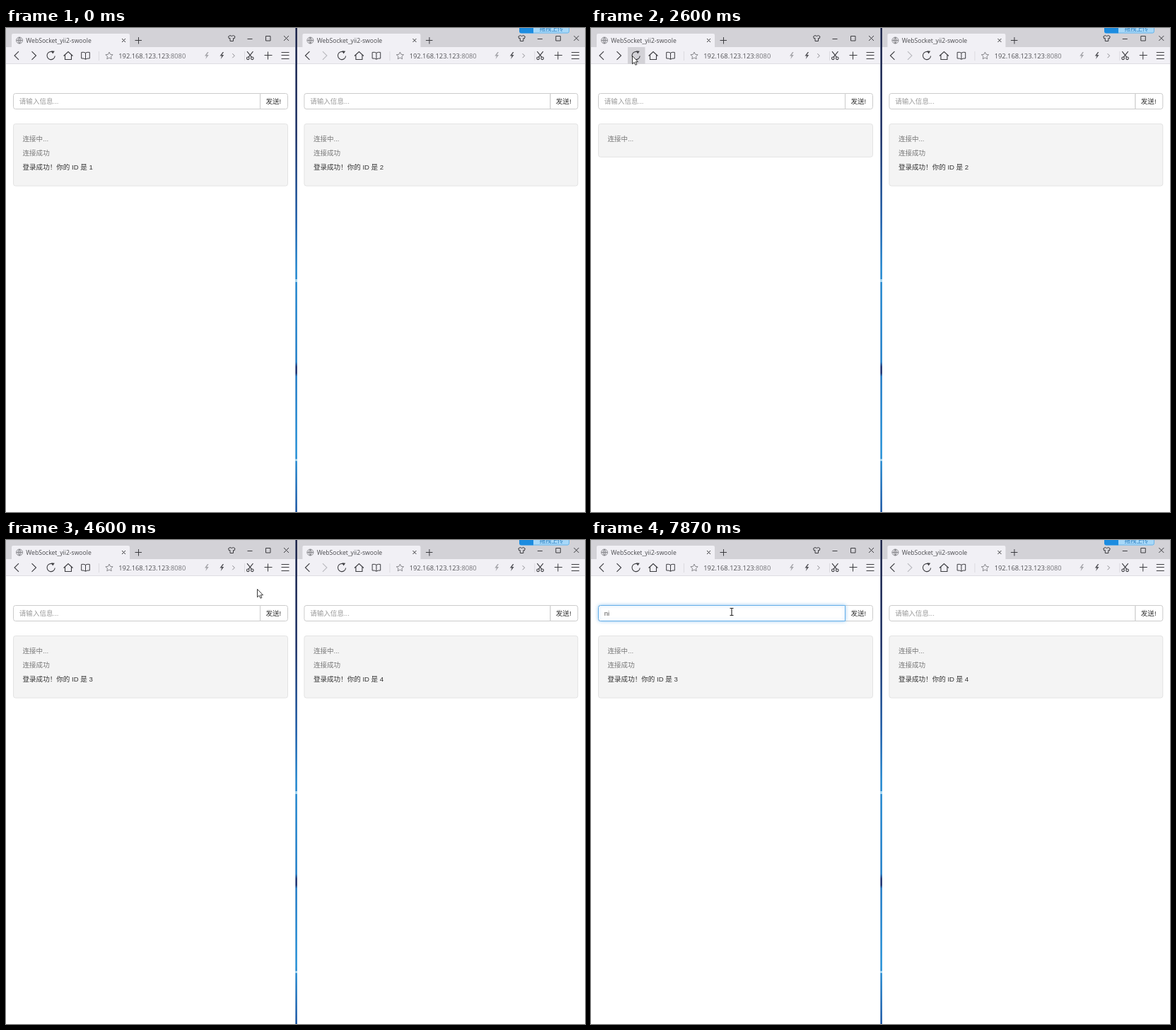
Write an HTML page with a canvas that moves like this. It is 819 px wide and 684 px high and loops after 8 s.

```html
<!DOCTYPE html>
<html lang="zh-CN">
<head>
<meta charset="utf-8">
<style>
html, body { margin: 0; width: 100%; height: 100%; overflow: hidden; background: #fff; }
canvas { display: block; }
</style>
</head>
<body>
<canvas id="stage" width="819" height="684"></canvas>
<script>
const ctx = document.getElementById('stage').getContext('2d');
const LOOP = 8000, STEP = 200 / 3;
const PAGE_FONT = '9.55px "Liberation Sans", "Noto Sans CJK SC", "Noto Sans CJK", sans-serif';
const UI_FONT = '"Open Sans", "Noto Sans", sans-serif';
const BAR = '#f1f0f5', STRIP = '#d3d2d7', HOVER = '#d3d2d7', INK = '#3c3c40';

// Pointer stops: step, x, y
const STOPS = [
  [6, 763, 655], [16, 213, 290], [18, 165, 189], [19, 152, 167], [22, 120, 110],
  [26, 86, 52], [27, 77, 44], [29, 81, 40], [31, 90, 39], [32, 72, 38], [33, 58, 39],
  [46, 58, 39], [47, 131, 40], [52, 330, 34], [56, 468, 46], [57, 477, 44],
  [61, 477, 44], [62, 475, 43], [65, 475, 43], [70, 325, 76], [74, 199, 101]
];

function pointerAt(step) {
  if (step < STOPS[0][0]) return null;
  for (let i = 1; i < STOPS.length; i++) {
    const [s0, x0, y0] = STOPS[i - 1], [s1, x1, y1] = STOPS[i];
    if (step <= s1) {
      const k = (step - s0) / (s1 - s0);
      return { x: Math.round(x0 + (x1 - x0) * k), y: Math.round(y0 + (y1 - y0) * k) };
    }
  }
  const last = STOPS[STOPS.length - 1];
  return { x: last[1], y: last[2] };
}

function rect(x, y, w, h, color) {
  ctx.fillStyle = color;
  ctx.fillRect(x, y, w, h);
}

function text(str, x, y, color, font) {
  ctx.font = font;
  ctx.fillStyle = color;
  ctx.fillText(str, x, y);
}

function stroke(d, color = INK, width = 1) {
  ctx.strokeStyle = color;
  ctx.lineWidth = width;
  ctx.stroke(new Path2D(d));
}

function fill(d, color) {
  ctx.fillStyle = color;
  ctx.fill(new Path2D(d));
}

function box(x, y, w, h, radii, line, back) {
  ctx.beginPath();
  ctx.roundRect(x, y, w, h, radii);
  ctx.fillStyle = back;
  ctx.fill();
  ctx.strokeStyle = line;
  ctx.lineWidth = 1;
  ctx.stroke();
}

function at(x, draw) {
  ctx.save();
  ctx.translate(x, 0);
  draw();
  ctx.restore();
}

function drawTab(loading) {
  fill('M8 27V10Q8 8 10 8H173Q175 8 175 10V27Z', BAR);
  if (loading) {
    stroke('M19 13A4.5 4.5 0 1 1 14.5 17.5', '#777');
  } else {
    stroke('M14.5 17.5a4.5 4.5 0 1 0 9 0a4.5 4.5 0 1 0 -9 0M14.5 17.5h9M19 13v9' +
      'M19 13q-4.2 4.5 0 9M19 13q4.2 4.5 0 9', '#77777b', 0.8);
  }
  text('WebSocket_yii2-swoole', 28.3, 20.6, '#4a4a4e', '8.6px ' + UI_FONT);
  stroke('M164 15l5 5m0 -5l-5 5', INK);
  stroke('M182.5 17.5h9.5M187.5 13v9.5', INK);
}

function drawWindowButtons() {
  stroke('M317 10.5l-2.5 1.5l1 3l1.5 -.5v4h4.5v-4l1.5 .5l1 -3l-2.5 -1.5q-2.2 2 -4.5 0Z', INK);
  stroke('M341.5 15.5h7', INK, 1);
  stroke('M367.5 11.5h6.5v6.5h-6.5Z', INK, 1);
  stroke('M393 11l7 7m0 -7l-7 7', INK, 1);
}

function drawTools(forward) {
  stroke('M18 33.2l-6 5.8l6 5.8', INK, 1.1);
  stroke('M36.5 33.2l6 5.8l-6 5.8', forward, 1.1);
  stroke('M66.5 34.2A5.6 5.6 0 1 0 69.2 39.5', INK, 1.1);
  fill('M64.2 32.2l4.6 .6l-2.8 3.6Z', INK);
  stroke('M81.5 39.5l6.5 -6l6.5 6M83.5 38v6.5h9v-6.5', INK, 1.1);
  stroke('M112.5 35.2q-2.5 -1.5 -5.8 -.8v8.6q3.5 -.4 5.8 1.2q2.3 -1.6 5.8 -1.2v-8.6q-3.3 -.7 -5.8 .8Z' +
    'M112.5 35.2v9', INK, 1);
  stroke('M131.5 33v13', '#dcdbe0');
  let star = '';
  for (let i = 0; i < 10; i++) {
    const r = i % 2 ? 2.6 : 5.4, a = (i / 5 - 0.5) * Math.PI;
    star += (i ? 'L' : 'M') + (146 + r * Math.cos(a)) + ' ' + (39.4 + r * Math.sin(a));
  }
  stroke(star + 'Z', '#7d7d82', 0.9);
  const font = '9.3px ' + UI_FONT, host = '192.168.123.123';
  text(host, 159.3, 42.6, '#505054', font);
  const w = ctx.measureText(host).width;
  text(':8080', 159.3 + w, 42.6, '#77777b', font);
}

function drawExtras() {
  const bolt = 'l-4 5.4h2.6l-1.4 4.6l4.6 -6h-2.8l2.6 -4Z';
  fill('M285 34' + bolt, '#a5a5aa');
  fill('M306.5 34' + bolt, '#55555a');
  stroke('M320.3 36.2l3 3l-3 3', '#8a8a8e');
  stroke('M337.5 33v13', '#dcdbe0');
  stroke('M341 33.2l6.5 8M349.5 33.2l-6.5 8', INK, 1.1);
  stroke('M340.5 42.8a1.8 1.8 0 1 0 3.6 0a1.8 1.8 0 1 0 -3.6 0' +
    'M346.5 42.8a1.8 1.8 0 1 0 3.6 0a1.8 1.8 0 1 0 -3.6 0', INK, 1.1);
  stroke('M365.5 38.5h11M370.5 33.5v11', INK);
  stroke('M389.5 34.5h11M389.5 38.5h11M389.5 43.5h11', INK);
}

// focus: 0..1 glow; typed: entered text; caret: visible or not
function drawForm(right, focus, typed, caret) {
  const split = right - 39;
  box(split, 92.5, 39, 22, [0, 3, 3, 0], '#ccc', '#fff');
  box(10.5, 92.5, split - 10.5, 22, [3, 0, 0, 3], '#ccc', '#fff');
  if (focus) {
    ctx.save();
    ctx.globalAlpha = focus;
    ctx.shadowColor = 'rgba(102,175,233,.6)';
    ctx.shadowBlur = 5.5;
    box(10.5, 92.5, split - 10.5, 22, [3, 0, 0, 3], '#66afe9', '#fff');
    ctx.restore();
  }
  text(typed || '请输入信息...', 18.8, 107, typed ? '#555' : '#999', PAGE_FONT);
  if (caret) {
    const x = typed ? 18.8 + ctx.measureText(typed).width : 19;
    rect(Math.floor(x), 98, 1, 11, '#444');
  }
  text('发送!', split + 8, 107, '#333', PAGE_FONT);
}

function drawLog(right, lines, id) {
  box(10.5, 135.5, right - 10.5, 26.4 + 20.4 * lines, 3, '#e3e3e3', '#f4f4f4');
  ['连接中...', '连接成功', '登录成功！你的 ID 是 ' + id].slice(0, lines).forEach((line, i) =>
    text(line, 23.5, 159.6 + 20.4 * i, i < 2 ? '#777' : '#333', PAGE_FONT));
}

// Lines in the log after a reload that starts at the given step; 0 is a blank page
function logLines(step, reload) {
  const n = step - reload;
  return n < 0 ? 3 : n < 2 ? 0 : Math.min(3, n - 1);
}

function drawWindow(left, shift, w) {
  const right = 398.5 + shift - left;
  at(left, () => {
    rect(0, 0, w.width, 27, STRIP);
    rect(0, 27, w.width, 23, BAR);
    rect(0, 50, w.width, 1, '#dedde2');
    if (w.hover) rect(w.hover, 27, 24.5, 24, HOVER);
    drawTab(!w.lines);
    drawTools(w.forward);
    if (w.lines) {
      drawForm(right, w.focus, w.typed, w.caret);
      drawLog(right, w.lines, w.id);
    }
  });
  at(shift, () => {
    drawWindowButtons();
    drawExtras();
  });
}

function drawDivider() {
  const g = ctx.createLinearGradient(0, 0, 0, 684);
  [[0, '#10173c'], [0.22, '#14285f'], [0.4, '#1559a8'], [0.5, '#1c86d0'], [0.69, '#1a7cc8'],
   [0.7, '#12296a'], [0.713, '#12296a'], [0.72, '#1a78c6'], [0.88, '#2090d8'], [1, '#1450a0']]
    .forEach(([p, c]) => g.addColorStop(p, c));
  rect(409, 0, 1, 684, '#c4cfe0');
  rect(409.5, 0, 2.3, 684, g);
  rect(409, 355, 3, 4, '#a9d8f2');
  rect(409, 609, 3, 3, '#a9d8f2');
}

function drawUpload() {
  ctx.save();
  ctx.beginPath();
  ctx.roundRect(726, -6, 71, 13.5, 3);
  ctx.clip();
  rect(726, 0, 71, 8, '#a8d8f8');
  text('拖拽上传', 754.5, 3.6, '#2b7fc0', '8.5px "Noto Sans CJK SC", "Noto Sans CJK", sans-serif');
  rect(726, 0, 20, 8, '#1c8ce0');
  ctx.restore();
  stroke('M746 7H794.5Q796.5 7 796.5 4V0', '#6cb4e6');
}

function drawPointer(p) {
  const inField = p.y > 92 && p.y < 115 && p.x > 10 && p.x < 360;
  ctx.save();
  ctx.translate(p.x, p.y);
  if (inField) {
    stroke('M-2.5 -4.5h2l.5 .5l.5 -.5h2M0 -4.5v10M-2.5 5.5h2l.5 -.5l.5 .5h2', '#222', 1.1);
  } else {
    const arrow = 'M.5 .5V11.8L3.2 9.4L5 13.3L6.8 12.5L5.1 8.8H8.5Z';
    fill(arrow, '#fff');
    stroke(arrow, '#222', 0.9);
  }
  ctx.restore();
}

function draw(step) {
  // Button highlights trail the pointer by one step
  const p = pointerAt(step), old = pointerAt(step - 1);
  const hover = (left) => {
    if (!old || old.y < 27 || old.y > 51) return 0;
    const x = old.x - left;
    return x >= 52 && x < 76 ? 52 : x >= 76 && x < 101 ? 76 : 0;
  };
  const typed = step < 92 ? '' : step < 94 ? 'n' : 'ni';
  const caret = (step >= 77 && step < 85) || (step >= 92 && step < 102) || (step >= 110 && step < 118);
  const focus = step < 77 ? 0 : Math.min(1, 0.2 + (step - 77) * 0.42);

  rect(0, 0, 819, 684, '#fff');
  drawWindow(0, 0, {
    width: 409, forward: INK, hover: hover(0), lines: logLines(step, 37),
    id: step < 37 ? 1 : 3, focus, typed, caret
  });
  drawWindow(411.4, 410.3, {
    width: 408, forward: '#b9b9be', hover: hover(411), lines: logLines(step, 64),
    id: step < 64 ? 2 : 4, focus: 0, typed: '', caret: false
  });
  drawDivider();
  drawUpload();
  if (p) drawPointer(p);
}

function tick() {
  draw(Math.floor(((performance.now() % LOOP) + 5) / STEP));
  requestAnimationFrame(tick);
}
tick();
</script>
</body>
</html>
```
